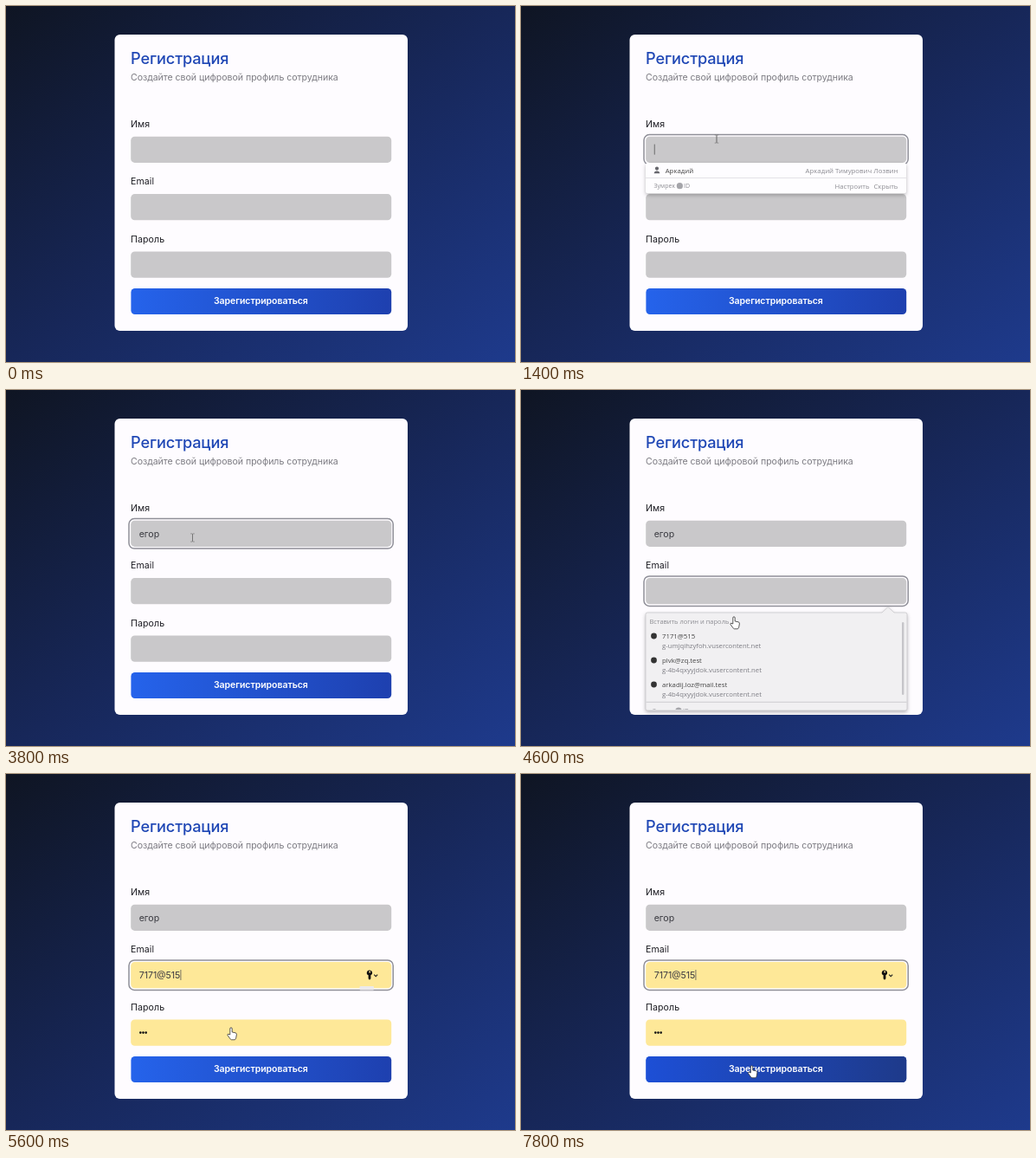
An HTML page for the animation above (8 s loop, 588 by 411 pixels).

```html
<!DOCTYPE html>
<html lang="ru">
<head>
<meta charset="utf-8">
<style>
  html, body { margin: 0; width: 100%; height: 100%; overflow: hidden; }
  body { background: linear-gradient(to bottom right, #0f1523, #172759 50%, #1e3a8c); }
  svg { display: block; width: 588px; height: 411px; font: 400 10.6px Inter, sans-serif; letter-spacing: .08px; fill: #1d1d23; }
  .title { font-weight: 500; font-size: 18.2px; letter-spacing: -.16px; fill: #1f47b5; }
  .sub { letter-spacing: -.04px; fill: #7c7b82; }
  .value { letter-spacing: 0; fill: #3a3a40; }
  .button { font-weight: 600; letter-spacing: -.1px; fill: #fff; text-anchor: middle; }
  .popup { font: 400 7.8px "Open Sans", "Noto Sans", sans-serif; letter-spacing: 0; fill: #444; }
  .popup .dim { fill: #8c8c92; }
  .popup .host { font-size: 7.7px; fill: #7d7d84; }
  .end { text-anchor: end; }
  .shadow { filter: drop-shadow(0 2px 2px #0004); }
</style>
</head>
<body>
<svg viewBox="0 0 588 411">
  <defs>
    <linearGradient id="blue"><stop stop-color="#2563eb"/><stop offset="1" stop-color="#1e40af"/></linearGradient>
    <linearGradient id="deep"><stop stop-color="#1d4fd6"/><stop offset="1" stop-color="#1e3a8a"/></linearGradient>
    <clipPath id="listClip"><rect x="144" y="257" width="302" height="112"/></clipPath>
  </defs>

  <rect x="125.5" y="33" width="338.5" height="342" rx="6" fill="#fefcff"/>
  <text class="title" x="144" y="67">Регистрация</text>
  <text class="sub" x="144" y="86">Создайте свой цифровой профиль сотрудника</text>
  <text x="144" y="139.5">Имя</text>
  <text x="144" y="206">Email</text>
  <text x="144" y="272.5">Пароль</text>

  <g fill="#c9c8ca">
    <rect x="144.2" y="150.7" width="301" height="30.2" rx="4.5"/>
    <rect id="emailBox" x="144.2" y="217.1" width="301" height="30.2" rx="4.5"/>
    <rect id="passBox" x="144.2" y="283.5" width="301" height="30.2" rx="4.5"/>
  </g>
  <rect id="ring" x="142" width="305.2" height="34.4" rx="6.2" fill="none" stroke="#8f8f98" stroke-width="1.5"/>
  <text id="name" class="value" x="153.7" y="169.5"></text>
  <text id="email" class="value" x="153.7" y="236"></text>
  <rect id="caret" width=".8" height="12" fill="#555"/>

  <g id="filled" fill="#111">
    <circle cx="155.3" cy="298.6" r="1.3"/>
    <circle cx="158.5" cy="298.6" r="1.3"/>
    <circle cx="161.7" cy="298.6" r="1.3"/>
    <path fill-rule="evenodd" d="M420.2 226.4a3.1 3.1 0 0 1 1.2 5.9v4l-1.4 1.5-1.4-1.5v-4a3.1 3.1 0 0 1 1.6-5.9zm0 1.2a.9.9 0 1 0 .01 0z"/>
    <path d="M425.2 231.7l2 2 2-2" fill="none" stroke="#222" stroke-width="1.2"/>
  </g>
  <rect id="tail" x="408.5" y="245" width="16.5" height="4.5" rx="1" fill="#eceaec"/>

  <rect x="144.4" y="325.9" width="300.8" height="30.2" rx="4.5" fill="url(#blue)"/>
  <rect id="hover" x="144.4" y="325.9" width="300.8" height="30.2" rx="4.5" fill="url(#deep)"/>
  <text class="button" x="294.3" y="344.3">Зарегистрироваться</text>

  <g id="namePopup" class="popup">
    <rect class="shadow" x="144" y="181" width="301" height="35.3" rx="2.5" fill="#fefdff"/>
    <path d="M144 198.5h301" stroke="#dddce0" stroke-width=".8"/>
    <path d="M157 185.5a2 2 0 0 1 0 4.2a2 2 0 0 1 0-4.2zm-3.3 7.8q0-2.9 3.3-2.9t3.3 2.9z" fill="#66666c"/>
    <text x="166.7" y="192.8">Аркадий</text>
    <text class="dim end" x="435.5" y="192.8">Аркадий Тимурович Лозвин</text>
    <g font-size="7">
      <text class="dim" x="153.5" y="210.2">Зумрек</text>
      <circle cx="183.4" cy="207.7" r="3.6" fill="#a5a5aa"/>
      <text class="dim" x="188" y="210.2">ID</text>
    </g>
    <text class="dim end" x="402.5" y="210.6">Настроить</text>
    <text class="dim end" x="435.5" y="210.6">Скрыть</text>
  </g>

  <g id="listPopup" class="popup">
    <path class="shadow" d="M146 257h271l7-6.5 7 6.5h13q2 0 2 2v109q0 2-2 2h-298q-2 0-2-2v-109q0-2 2-2z" fill="#f1f0f2" stroke="#c4c3c7" stroke-width=".7"/>
    <text class="dim" x="148.5" y="270.2" font-size="7.5">Вставить логин и пароль</text>
    <g id="rows"></g>
    <rect x="440" y="268" width="2.4" height="84" rx="1.2" fill="#c6c5c9"/>
    <path d="M144.5 360.3h301" stroke="#c4c3c7" stroke-width=".8"/>
    <g clip-path="url(#listClip)">
      <text class="dim" x="152" y="373" font-size="7">Зумрек</text>
      <circle cx="182" cy="370" r="3.6" fill="#a5a5aa"/>
      <text class="dim" x="187" y="373" font-size="7">ID</text>
    </g>
  </g>

  <g id="cursor" stroke-linejoin="round">
    <path id="arrow" d="M0 0v10.2l2.3-2.1 1.7 3.7 1.7-.8-1.7-3.6h3.2z" fill="#fff" stroke="#333" stroke-width=".8"/>
    <path id="beam" d="M-2.3-4.6h1.5q.8 0 .8.8v7.6q0 .8-.8.8h-1.5M2.3-4.6h-1.5q-.8 0-.8.8v7.6q0 .8.8.8h1.5" fill="none" stroke="#666" stroke-width=".6"/>
    <path id="hand" d="M-1.2 8V1a1.2 1.2 0 0 1 2.4 0V5l3.8.8q1.6.4 1.4 2l-.6 3.4q-.3 2-1.4 2.6h-4q-1-.3-1.8-1.6l-2.6-3.6q-.4-1.5.9-1.3z" fill="#fff" stroke="#333" stroke-width=".8"/>
  </g>
</svg>
<script>
const $ = id => document.getElementById(id);
const LOOP = 8000, STEP = 200;
const LOGIN = '7171@515', NAME = 'егор';
const typedAt = [2200, 2600, 3000, 3400];

// time, x, y, pointer shape
const path = [
  [200, -12, 250, 'arrow'], [1000, 226, 160, 'beam'], [1400, 226, 153.5, 'beam'],
  [1800, 228.7, 147.5, 'arrow'], [2600, 228.7, 147.5, 'arrow'], [3000, 216, 166, 'beam'],
  [3800, 215.5, 170.5, 'beam'], [4200, 232, 232, 'beam'], [4600, 246, 262, 'hand'],
  [4800, 256, 282, 'hand'], [5200, 256, 282, 'hand'], [5600, 260, 293, 'hand'],
  [6400, 264, 318, 'arrow'], [7000, 266.5, 337, 'hand'], [8000, 266.5, 337, 'hand']
];

$('rows').innerHTML = [
  [LOGIN, 'g-umjqihzyfoh.vusercontent.net'],
  ['plvk@zq.test', 'g-4b4qxyyjdok.vusercontent.net'],
  ['arkadij.loz@mail.test', 'g-4b4qxyyjdok.vusercontent.net']
].map(([login, host], i) => `<g transform="translate(0 ${i * 28})">
  <circle cx="153.5" cy="284" r="3.4" fill="#333"/>
  <text x="163" y="287">${login}</text>
  <text class="host" x="163" y="298">${host}</text></g>`).join('');

const show = (id, on) => $(id).style.display = on ? '' : 'none';
const within = (t, a, b) => t >= a && t < b;

function movePointer(t) {
  const i = path.findLastIndex(p => p[0] <= t);
  show('cursor', i >= 0);
  if (i < 0) return;
  const a = path[i], b = path[i + 1] || a;
  const k = b === a ? 0 : (t - a[0]) / (b[0] - a[0]);
  const at = n => a[n] + (b[n] - a[n]) * k;
  $('cursor').setAttribute('transform', `translate(${at(1)} ${at(2)})`);
  for (const shape of ['arrow', 'beam', 'hand']) show(shape, shape === a[3]);
}

function draw(t) {
  const onEmail = t >= 4200, filled = t >= 4800;
  $('name').textContent = NAME.slice(0, typedAt.filter(k => k <= t).length);
  $('email').textContent = filled ? LOGIN : '';
  for (const id of ['emailBox', 'passBox']) $(id).style.fill = filled ? '#fee898' : '';

  show('ring', t >= 1200);
  $('ring').setAttribute('y', onEmail ? 215 : 148.6);
  show('filled', filled);
  show('tail', within(t, 5400, 6000));
  show('namePopup', within(t, 1200, 2000));
  show('listPopup', within(t, 4400, 5400));
  $('hover').style.opacity = Math.min(1, Math.max(0, (t - 6800) / 400));

  // The caret restarts its blink after each edit
  const edit = [1200, ...typedAt, 4200, 5600].findLast(k => k <= t);
  show('caret', (t - edit) % 1000 < 400 && !within(t, 4800, 5400));
  const text = $(onEmail ? 'email' : 'name');
  const width = text.textContent ? text.getComputedTextLength() : 0;
  $('caret').setAttribute('x', 153.8 + width);
  $('caret').setAttribute('y', onEmail ? 226 : 159.6);
  movePointer(t);
}

function tick(now) {
  draw(Math.floor(now % LOOP / STEP) * STEP);
  requestAnimationFrame(tick);
}
draw(0);
requestAnimationFrame(tick);
</script>
</body>
</html>
```
